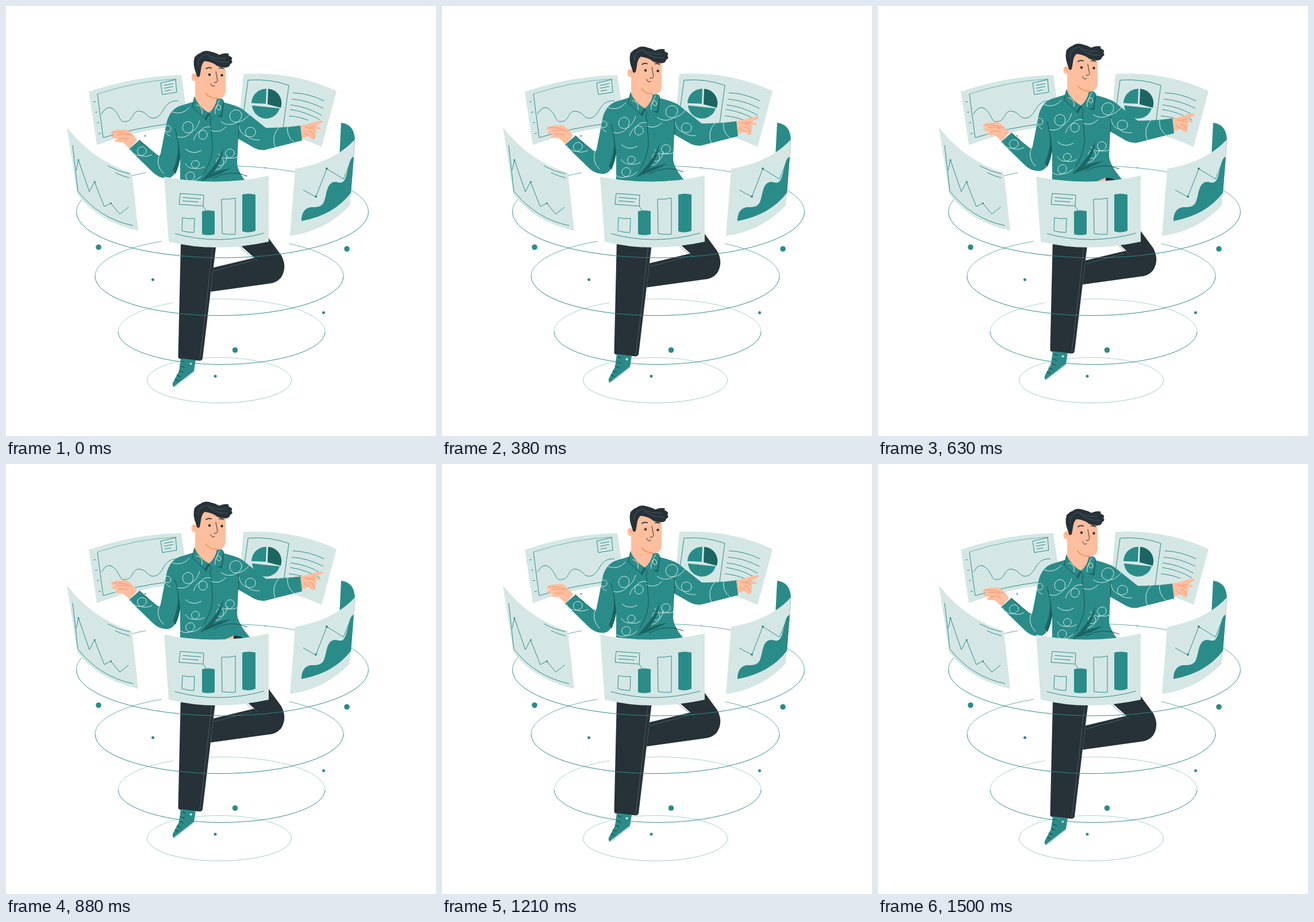
These frames come from a looping animation (748x748 px, 1540 ms). An HTML page:

```html
<!DOCTYPE html>
<html lang="en">
<head>
<meta charset="utf-8">
<style>
html, body { margin: 0; width: 100%; height: 100%; overflow: hidden; background: #fff; }
svg { display: block; width: 100%; height: 100%; }
.teal { fill: #2a8c89; }
.deep { fill: #1c6563; }
.pale { fill: #d4e7e5; }
.dark { fill: #263238; }
.skin { fill: #ffbe9d; }
.line { fill: none; stroke: #2a8c89; stroke-width: 1; }
.ink { fill: none; stroke: #263238; stroke-linecap: round; }
.crease { fill: none; stroke: #e58b6b; stroke-width: .8; }
.seam { fill: none; stroke: #596b73; stroke-width: .7; }
.fold { fill: none; stroke: #174f50; stroke-width: 1; }
#swirls { fill: none; stroke: #dcefed; stroke-width: 1; }
#loop, #bow { vector-effect: non-scaling-stroke; }
</style>
</head>
<body>
<svg viewBox="0 0 748 748">
  <defs>
    <path id="shirt" d="M328 166L302 174Q286 180 280 200L269 256Q268 263 262 258L232 233L214 249L254 288Q268 302 284 299Q298 295 303 264V320Q370 345 428 318Q402 290 402 272L404 231Q420 240 432 247Q442 252 452 250L515 234L512 208Q480 212 452 212L412 180Q404 174 380 168Z"/>
    <path id="loop" d="M-2.4 .5C-1 2 1.2 .9 1-.2C.7-1.4-1-1-.9 .2C-.7 1.3 1 1.4 2.4 0"/>
    <path id="bow" d="M-2 0Q0 1.4 2 0"/>
    <clipPath id="onShirt"><use href="#shirt"/></clipPath>
  </defs>

  <g id="back"></g>

  <g id="leftBackPanel">
    <path class="pale" d="M144 149Q222 122 305 120L318 208Q235 213 158 242Z"/>
    <path class="line" d="M159 153L169 229Q220 213 290 204M152 167l4-.6M155 185l4-.6M158 203l4-.6M161 222l4-.6"/>
    <path class="line" stroke-opacity=".6" d="M159 153Q230 130 297 127"/>
    <path class="line" d="M166 188Q176 171 186 179C200 190 196 203 208 201C222 200 219 181 233 183C247 185 246 197 258 195C276 192 272 163 300 165"/>
    <path class="line" d="M269 134L295 128L297 150L272 154ZM275 138L291 135M275 143L291 140M276 148L287 146"/>
  </g>

  <g id="rightBackPanel">
    <path class="pale" d="M413 118Q500 113 575 148L549 245Q480 215 405 205Z"/>
    <path class="line" d="M412 195L421 129Q458 126 492 138L482 212M499 151Q527 152 553 165M497 162Q525 164 552 178M495 172Q523 175 549 190M494 180Q522 184 546 198M492 191Q512 193 526 199"/>
    <path class="teal" d="M427 169A25.500 25.500 0 0 1 453 144L452 170ZM428 173L476 178A24.500 24.500 0 0 1 428 173Z"/>
    <path class="deep" d="M456 144A25 25 0 0 1 478 177L455 171Z"/>
  </g>
  <circle class="teal" cx="242" cy="226" r="1.3"/>
  <circle class="teal" cx="451" cy="281.5" r="1"/>

  <g id="person">
    <g id="legs">
      <path class="dark" d="M304 318H424L457 404L479 434Q490 455 478 473Q470 482 457 483L356 497L361 455L432 438L404 413L366 412L342 613Q341 617 337 617L303 614Q299 613 299.5 609L304 415Z"/>
      <path class="seam" d="M359 420Q349 520 337 615M362 461L428 443M404 416Q422 434 438 444"/>
    </g>
    <g id="shoe">
      <path class="teal" d="M304 613L330 616L327 635L292 663Q289 661 290 656L301 635Z"/>
      <path fill="none" stroke="#b7d9d6" stroke-width="2" d="M327 636L292 663"/>
      <path class="ink" d="M306 618l6 2M304 626l7 3M301 634l7 3M297 642l7 3M294 649l6 3"/>
      <circle class="pale" cx="321.5" cy="622" r="2"/>
    </g>
    <g id="hands">
      <path class="skin" d="M215 248L203 237Q191 237 189 235Q190 232 195 231Q184 231 183 227Q186 224 192 224Q182 224 182 220Q190 214 210 215Q220 221 228 233Z"/>
      <path class="crease" d="M192 224Q203 222 213 225M195 231Q205 229 213 231M185 219Q202 218 219 225"/>
      <path class="skin" d="M512 208L526 205Q540 200 549 199Q553 201 550 203L538 209Q548 210 548 214Q545 216 537 213Q541 218 539 224L537 231Q533 234 530 230L527 226L514 231Z"/>
      <path class="crease" d="M520 211Q530 212 538 209M527 213Q534 212 538 216M526 218Q532 218 535 224L537 230M518 220L528 227"/>
    </g>

    <use href="#shirt" class="teal"/>
    <g id="swirls" clip-path="url(#onShirt)"></g>
    <path class="deep" d="M300 236Q300 264 290 286L295 292Q301 278 303 264ZM378 247Q371 272 338 305Q372 293 392 282Q368 286 359 292Q378 268 378 247Z"/>
    <path class="fold" d="M294 213Q302 240 301 268M355 196Q358 225 359 240Q361 264 344 292M404 231Q406 215 404 204M232 233Q240 242 247 246M420 296Q390 283 360 300"/>
    <path class="skin" d="M378 319L398 310L397 322Z"/>
    <path class="dark" d="M396 311Q410 311 418 320L396 322Z"/>

    <path class="deep" d="M326 168L348 200L354 188L376 194L379 170L366 160Z"/>
    <path class="skin" d="M334 98L329 120V162Q336 176 353 186Q365 176 367 161Q382 161 382 146V100Q360 84 334 98Z"/>
    <path class="teal" d="M328 158L324 176L346 196L352 186Q335 175 328 158ZM367 162Q377 158 379 166L375 189Q363 194 352 186Q366 178 367 162Z"/>
    <path class="fold" d="M328 158L324 176L346 196L352 186L359 197M379 166L375 189"/>
    <path fill="none" stroke="#dcefed" d="M331 172Q343 174 341 188M372 163Q362 178 370 181Q377 180 371 172Q362 172 364 188"/>
    <path fill="none" stroke="#e99b5f" stroke-width="2" d="M347 151Q354 161 367 160.5"/>

    <ellipse class="skin" cx="327.5" cy="124" rx="5" ry="7"/>
    <path class="crease" d="M325 121Q329 120 330 126"/>
    <path class="dark" d="M331 118Q324 102 328 89Q335 82 338 82Q345 76 355 79Q364 81 371 85Q379 81 388 83Q385 86 391 88Q395 91 392 94Q396 98 390 101Q389 107 381 107Q369 107 363 101Q353 96 345 96Q340 101 339 111L337 122Q334 125 332 122Z"/>
    <path class="seam" d="M334 103Q334 86 350 84Q362 93 382 91M352 87Q365 99 386 98"/>
    <path class="ink" stroke-width="1.8" d="M348 109Q353 106 357 108M371 108Q375 107 378 109"/>
    <path class="ink" d="M365 114L368 130Q367 134 362 133M356 135Q358 142 363 138.5"/>
    <circle class="dark" cx="354" cy="119.5" r="2.2"/>
    <circle class="dark" cx="375.5" cy="120.5" r="2.2"/>
  </g>

  <g id="front"></g>

  <g id="leftPanel">
    <path class="pale" d="M106 211Q152 270 219 290L230 391Q160 375 124 327Z"/>
    <path class="line" d="M116 242L125 322Q163 370 221 382M122 286L126 268L145 323L154 306L171 349L182 343L198 362L213 350M177 278Q195 288 215 292M190 290Q202 296 215 299"/>
    <g class="teal"><circle cx="126" cy="268" r="1.5"/><circle cx="154.5" cy="306" r="1.5"/><circle cx="182.5" cy="343" r="1.5"/></g>
  </g>

  <g id="rightPanel">
    <path class="teal" d="M583 203Q607 206 607 235L600 325L578 300Z"/>
    <path class="pale" d="M503 283Q570 272 607 232L598 347Q555 392 494 400Z"/>
    <path class="teal" d="M514 374C514 357 522 350 533 350C543 350 549 349 553 341C558 330 557 308 571 306C580 305 585 313 591 298C597 281 596 266 605 262L600 325Q570 364 514 374Z"/>
    <path class="line" d="M517 320L539 332L558 283L587 301L602 265"/>
    <g class="teal"><circle cx="539" cy="331.5" r="2"/><circle cx="558" cy="283" r="2"/></g>
  </g>

  <g id="frontPanel">
    <path class="pale" d="M275 297Q370 315 457 295V410Q365 430 283 410Z"/>
    <path class="line" d="M303 326L344 329L343 348L301 345ZM307 333L339 335.5M307 339L335 341M343 348L348 356M307 368Q317 371 328 369.5L327 394Q317 394 306 391ZM375 336Q387 337 399 334V397Q387 398 376 396ZM294 396Q370 417 449 395"/>
    <path class="teal" d="M341 357Q352 354 363 357V397Q352 400 341 397ZM411 328Q422 325 434 328V391Q422 396 411 392Z"/>
  </g>

  <g id="dots" class="teal">
    <circle cx="161" cy="419.5" r="4.8"/><circle cx="593" cy="422.5" r="4.8"/><circle cx="398.5" cy="598.5" r="4.8"/>
    <circle cx="255.5" cy="476" r="2.5"/><circle cx="552.5" cy="533.5" r="2.5"/><circle cx="364" cy="644" r="2.5"/>
  </g>
</svg>
<script>
const byId = id => document.getElementById(id);

// cx, cy, rx, ry, dashes of the far half, far opacity, near opacity
const rings = [
  [376.5, 358, 254, 80, '47 22 111', .75, 1],
  [371, 470, 216, 68.5, '52 84 44', .7, 1],
  [375, 566.5, 180, 57, '52 12 116', .4, .95],
  [371, 651, 125.5, 39.5, '180', .4, .45]
];
const arc = (cx, cy, rx, ry, sweep, extra) =>
  `<path class="line" pathLength="180" d="M${cx - rx} ${cy}A${rx} ${ry} 0 0 ${sweep} ${cx + rx} ${cy}" ${extra}/>`;
for (const [cx, cy, rx, ry, dashes, far, near] of rings) {
  byId('back').innerHTML += arc(cx, cy, rx, ry, 1, `stroke-dasharray="${dashes} 180" opacity="${far}"`);
  byId('front').innerHTML += arc(cx, cy, rx, ry, 0, `opacity="${near}"`);
}

// x, y, size, angle
const loops = [
  [316, 211, 10, -30], [343, 224, 8, 150], [281, 213, 6, 70], [236, 252, 8, 20],
  [399, 191, 11, -10], [425, 219, 9, 40], [329, 275, 7, 15], [372, 271, 7, -40],
  [389, 256, 8, 10], [320, 296, 8, 0]
];
const bows = [
  [271, 274, 9, 80], [304, 180, 8, -15], [369, 213, 7, -12],
  [473, 229, 10, 100], [497, 222, 9, 70], [326, 250, 7, 5]
];
const place = shape => ([x, y, size, angle]) =>
  `<use href="#${shape}" transform="translate(${x} ${y}) rotate(${angle}) scale(${size})"/>`;
byId('swirls').innerHTML = [...loops.map(place('loop')), ...bows.map(place('bow'))].join('');

const LOOP = 1540, STEP = 1000 / 24, HALF = 750, RISE = 15;
const person = byId('person');
const start = performance.now();

function draw(now) {
  const elapsed = Math.max(0, now - start) % LOOP;
  const time = Math.floor((elapsed + 4) / STEP) * STEP;
  const lift = RISE * Math.max(0, 1 - Math.abs(1 - time / HALF));
  person.setAttribute('transform', `translate(0 ${-lift})`);
  requestAnimationFrame(draw);
}
draw(start);
</script>
</body>
</html>
```
